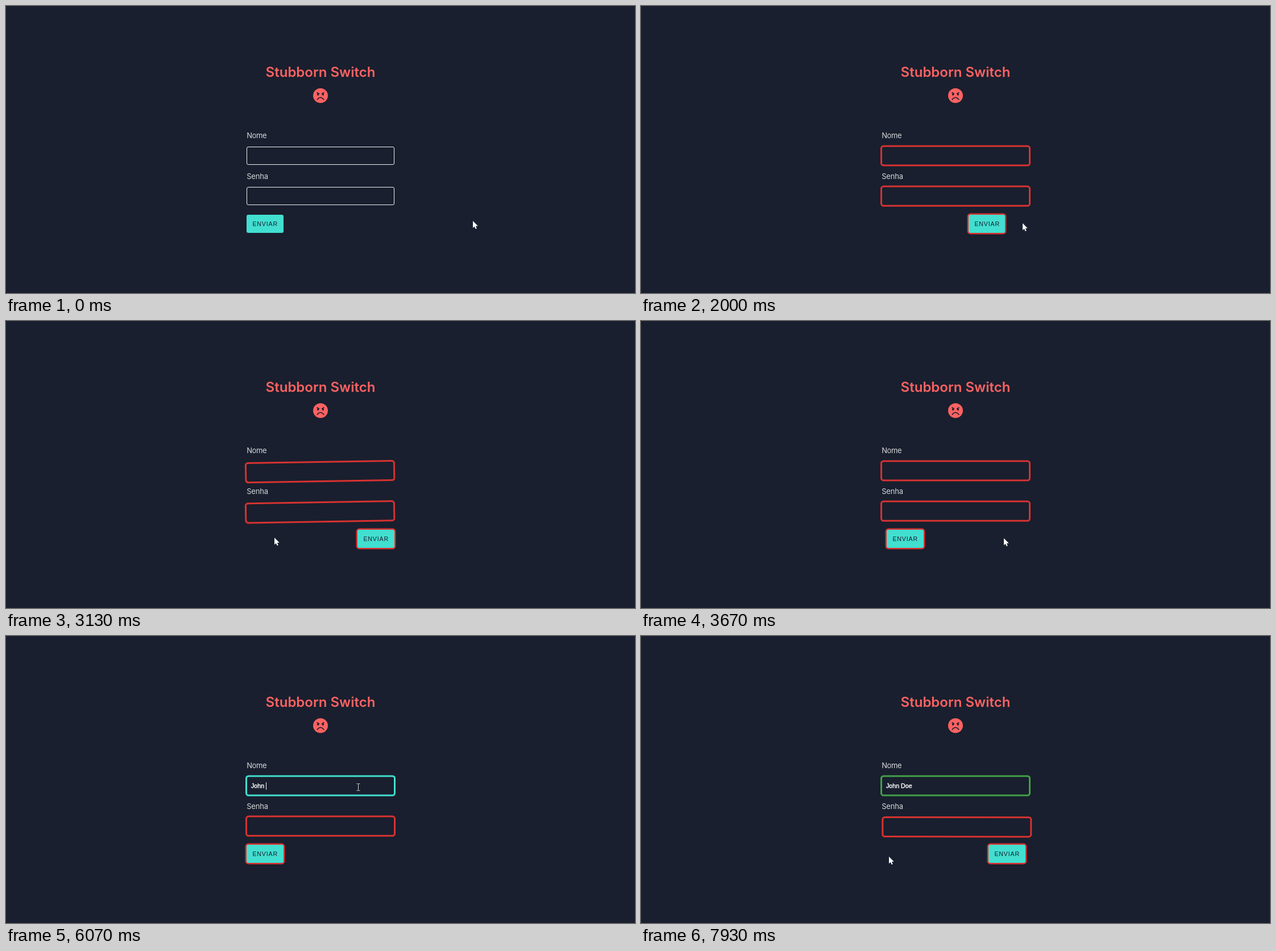
An HTML page with a canvas that plays this animation: 1106x506 px, repeating every 8000 ms.

```html
<!DOCTYPE html>
<html lang="pt">
<head>
<meta charset="utf-8">
<title>Form</title>
<style>
  html, body { margin: 0; width: 100%; height: 100%; overflow: hidden; background: #191f2e; }
  canvas { display: block; }
</style>
</head>
<body>
<canvas id="stage" width="1106" height="506"></canvas>
<script>
const ctx = document.getElementById('stage').getContext('2d');
const LOOP = 8000, FPS = 15;
const BG = '#191f2e', CORAL = '#ff6262', TEAL = '#42dfd0', RED = '#d83230', GREEN = '#43a047';
const SMALL = '10.67px "Liberation Sans", Arial, sans-serif';

const NAME = { x: 423.4, y: 247.8, w: 259.2, h: 32.4 };
const PASSWORD = { ...NAME, y: 319 };
const TRAVEL = 194.4, MOVE_MS = 200, SHAKE_MS = 500;
const FOCUS = 4460, BLUR = 7325, BLINK = 530;
const WORD_STARTS = [5195, 6065], KEY_MS = 155, WORD_KEYS = 4;

// Each crossing sends the button to the other side; going right also shakes the fields.
const crossings = [1287, 1967, 2880, 3520, 7780];
const FIRST_CHECK = crossings[0], LAST_CHECK = crossings[4];

// Pointer moves, each eased from wherever the last one ended
const pointerStart = { x: 821, y: 379 };
const moves = [
  { from: 30, to: 267, x: 802, y: 391 },
  { from: 933, to: 1450, x: 441, y: 385 },
  { from: 1560, to: 2035, x: 675, y: 383 },
  { from: 2470, to: 3040, x: 465, y: 382 },
  { from: 3050, to: 3720, x: 641, y: 383 },
  { from: 3720, to: 4400, x: 620, y: 266 },
  { from: 7000, to: 7333, x: 679, y: 429 },
  { from: 7467, to: 7900, x: 436, y: 389 }
];

const clamp = (v, lo, hi) => Math.min(hi, Math.max(lo, v));
const mix = (a, b, k) => a + (b - a) * k;
const smooth = p => p * p * (3 - 2 * p);

// CSS "ease": cubic-bezier(.25, .1, .25, 1)
function ease(p) {
  const bez = (s, a, b) => 3 * s * (1 - s) ** 2 * a + 3 * s * s * (1 - s) * b + s ** 3;
  let lo = 0, hi = 1;
  for (let i = 0; i < 24; i++) {
    const mid = (lo + hi) / 2;
    if (bez(mid, .25, .25) < p) lo = mid; else hi = mid;
  }
  return bez(lo, .1, 1);
}

function pointerAt(t) {
  return moves.reduce((at, m) => {
    const k = smooth(clamp((t - m.from) / (m.to - m.from), 0, 1));
    return { x: mix(at.x, m.x, k), y: mix(at.y, m.y, k) };
  }, pointerStart);
}

// Three short cycles of different lengths make the shake look irregular.
function shakeStep(i) {
  const flip = Math.floor(i / 3) % 2 ? -1 : 1;
  return [[1, -1, -3, 3][i % 4], [1, -2, 0, 2, -1, 2][i % 6], [0, -1, 1][i % 3] * flip];
}

function shakeAt(t) {
  const start = crossings.find((c, i) => i % 2 === 0 && t >= c && t < c + SHAKE_MS);
  if (start === undefined) return [0, 0, 0];
  const p = (t - start) / SHAKE_MS * 10, i = Math.floor(p), next = shakeStep(i + 1);
  return shakeStep(i).map((v, n) => mix(v, next[n], p - i));
}

function buttonX(t) {
  const passed = crossings.filter(c => t >= c);
  if (!passed.length) return NAME.x;
  const k = ease(clamp((t - passed.at(-1)) / MOVE_MS, 0, 1));
  return NAME.x + TRAVEL * (passed.length % 2 ? k : 1 - k);
}

function text(str, x, y, font, color, align = 'left', spacing = 0) {
  ctx.font = font;
  ctx.textAlign = align;
  ctx.letterSpacing = spacing + 'px';
  ctx.fillStyle = color;
  ctx.fillText(str, x, y);
}

function line(points, color, width) {
  ctx.beginPath();
  points.forEach(([x, y]) => ctx.lineTo(x, y));
  ctx.strokeStyle = color;
  ctx.lineWidth = width;
  ctx.stroke();
}

function frame({ x, y, w, h }, color, width, spread, radius) {
  const d = spread - width / 2;
  ctx.beginPath();
  ctx.roundRect(x - d, y - d, w + 2 * d, h + 2 * d, radius);
  ctx.strokeStyle = color;
  ctx.lineWidth = width;
  ctx.stroke();
}

const ring = (box, color) => frame(box, color, 3, 2.4, 4);

function snap({ x, y, w, h }) {
  const left = Math.round(x), top = Math.round(y);
  return { x: left, y: top, w: Math.round(x + w) - left, h: Math.round(y + h) - top };
}

function field(box, color, [dx, dy, angle]) {
  if (!color) return frame(snap(box), '#f2f2f4', 1, 0, 2.5);
  const cx = box.x + box.w / 2, cy = box.y + box.h / 2;
  ctx.save();
  ctx.translate(cx + dx * .8, cy + dy * .8);
  ctx.rotate(angle * Math.PI / 180);
  ctx.translate(-cx, -cy);
  ring(box, color);
  ctx.restore();
}

function disc(x, y, r, color) {
  ctx.beginPath();
  ctx.arc(x, y, r, 0, 7);
  ctx.fillStyle = color;
  ctx.fill();
}

function angryFace() {
  ctx.save();
  ctx.translate(553, 158);
  ctx.lineCap = 'round';
  disc(0, 0, 13, CORAL);
  for (const side of [-1, 1]) {
    disc(4.4 * side, -2, 1.8, BG);
    line([[6 * side, -5.2], [2.6 * side, -3.5]], BG, 1.6);
  }
  ctx.beginPath();
  ctx.moveTo(-5.8, 7);
  ctx.quadraticCurveTo(0, -.6, 5.8, 7);
  ctx.stroke();
  ctx.restore();
}

function arrow(x, y) {
  ctx.beginPath();
  [[0, 0], [0, 12.2], [2.8, 9.7], [4.7, 14], [6.7, 13.2], [4.9, 8.9], [8.7, 8.7]]
    .forEach(([px, py]) => ctx.lineTo(x + px, y + py));
  ctx.closePath();
  ctx.fillStyle = '#fff';
  ctx.fill();
}

function beam(x, y) {
  const c = '#d8d8da';
  line([[x, y - 6], [x, y + 6]], c, 1);
  for (const end of [-6, 6]) {
    line([[x - 3, y + end], [x - .7, y + end]], c, 1);
    line([[x + .7, y + end], [x + 3, y + end]], c, 1);
  }
}

function pointer(t) {
  const { x, y } = pointerAt(t);
  const over = b => x > b.x && x < b.x + b.w && y > b.y && y < b.y + b.h;
  if (over(NAME) || over(PASSWORD)) beam(Math.round(x) - .5, Math.round(y) + .5);
  else arrow(Math.round(x), Math.round(y));
}

function typed(t) {
  let count = 0, lastKey = FOCUS;
  for (const start of WORD_STARTS) {
    const keys = clamp(Math.floor((t - start) / KEY_MS) + 1, 0, WORD_KEYS);
    count += keys;
    if (keys) lastKey = start + (keys - 1) * KEY_MS;
  }
  const str = 'John Doe'.slice(0, count);
  text(str, 431, 268, SMALL, '#fff');
  ctx.strokeStyle = '#fff';
  ctx.lineWidth = .4;
  ctx.strokeText(str, 431, 268);
  if (t >= FOCUS && t < lastKey + BLINK) {
    ctx.fillStyle = '#fff';
    ctx.fillRect(Math.round(431 + ctx.measureText(str).width), 258, 1, 13);
  }
}

function sendButton(t, checked) {
  const box = snap({ x: buttonX(t), y: 367.6, w: 64.8, h: 32.4 });
  if (checked) ring(box, RED);
  ctx.beginPath();
  ctx.roundRect(box.x, box.y, box.w, box.h, 3);
  ctx.fillStyle = TEAL;
  ctx.fill();
  text('ENVIAR', box.x + 10.4, 388, SMALL, BG, 'left', .8);
}

function draw(t) {
  ctx.fillStyle = BG;
  ctx.fillRect(0, 0, 1106, 506);
  text('Stubborn Switch', 553, 125, '600 24px Inter, sans-serif', CORAL, 'center');
  angryFace();

  const label = '13px Inter, sans-serif';
  text('Nome', 423.2, 233.3, label, '#d6d7da', 'left', -.4);
  text('Senha', 423.2, 304.5, label, '#d6d7da', 'left', -.2);

  const checked = t >= FIRST_CHECK, shake = shakeAt(t);
  const valid = t >= LAST_CHECK, focused = t >= FOCUS && t < BLUR;
  field(NAME, valid ? GREEN : focused ? TEAL : checked && RED, valid ? [0, 0, 0] : shake);
  field(PASSWORD, checked && RED, shake);
  typed(t);
  sendButton(t, checked);
  pointer(t);
}

function tick() {
  const t = performance.now() % LOOP;
  draw(Math.floor((t + 3.5) * FPS / 1000) * 1000 / FPS % LOOP);
  requestAnimationFrame(tick);
}
tick();
</script>
</body>
</html>
```
